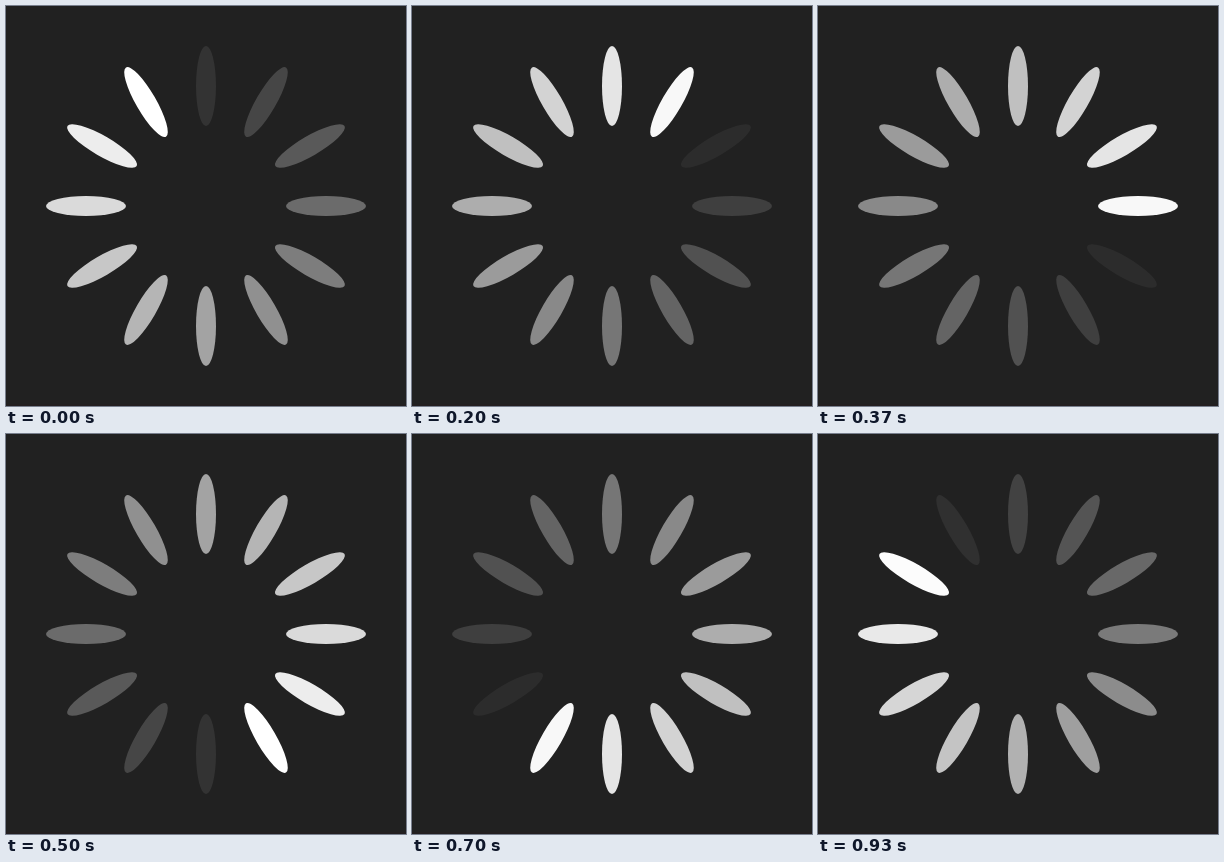
These frames come from a looping animation (400x400 px, 1 s). An HTML page:

```html
<!DOCTYPE html>
<html lang="en">
<head>
<meta charset="utf-8">
<title>Loading spinner</title>
<style>
  html, body { margin: 0; width: 100%; height: 100%; overflow: hidden; background: #212121; }
  svg { display: block; width: 100vw; height: 100vh; }
</style>
</head>
<body>
<svg id="spinner" viewBox="0 0 400 400">
  <rect width="400" height="400" fill="#212121"/>
  <rect y="398" width="400" height="2" fill="#231f20"/>
</svg>
<script>
  const COUNT = 12, LOOP = 1000, TICKS = 30;
  // Ticks of the 30-per-loop clock on which the picture changes
  const STOPS = [0, 2, 4, 6, 8, 11, 13, 15, 18, 21, 23, 26, 28];
  const svg = document.getElementById('spinner');

  const spokes = Array.from({ length: COUNT }, (_, i) => {
    const el = document.createElementNS('http://www.w3.org/2000/svg', 'ellipse');
    const attrs = { cx: 200, cy: 80, rx: 10, ry: 40, fill: '#fff',
                    transform: `rotate(${i * 360 / COUNT} 200 200)` };
    for (const name in attrs) el.setAttribute(name, attrs[name]);
    return svg.appendChild(el);
  });

  // Stops land on whole hundredths of a second
  const startOf = tick => Math.round(tick * 100 / TICKS) * 10;

  function draw(now) {
    const time = now % LOOP;
    const tick = STOPS.filter(s => startOf(s) <= time).pop();
    // Each spoke flashes white in turn, then fades linearly to nothing
    spokes.forEach((el, i) => {
      const steps = tick * COUNT / TICKS - (i + 1);
      const age = (steps + 2 * COUNT + 1e-9) % COUNT / COUNT;
      el.setAttribute('fill-opacity', (1 - age).toFixed(4));
    });
  }

  const origin = performance.now();
  function loop() {
    draw(performance.now() - origin);
    requestAnimationFrame(loop);
  }
  loop();
</script>
</body>
</html>
```
